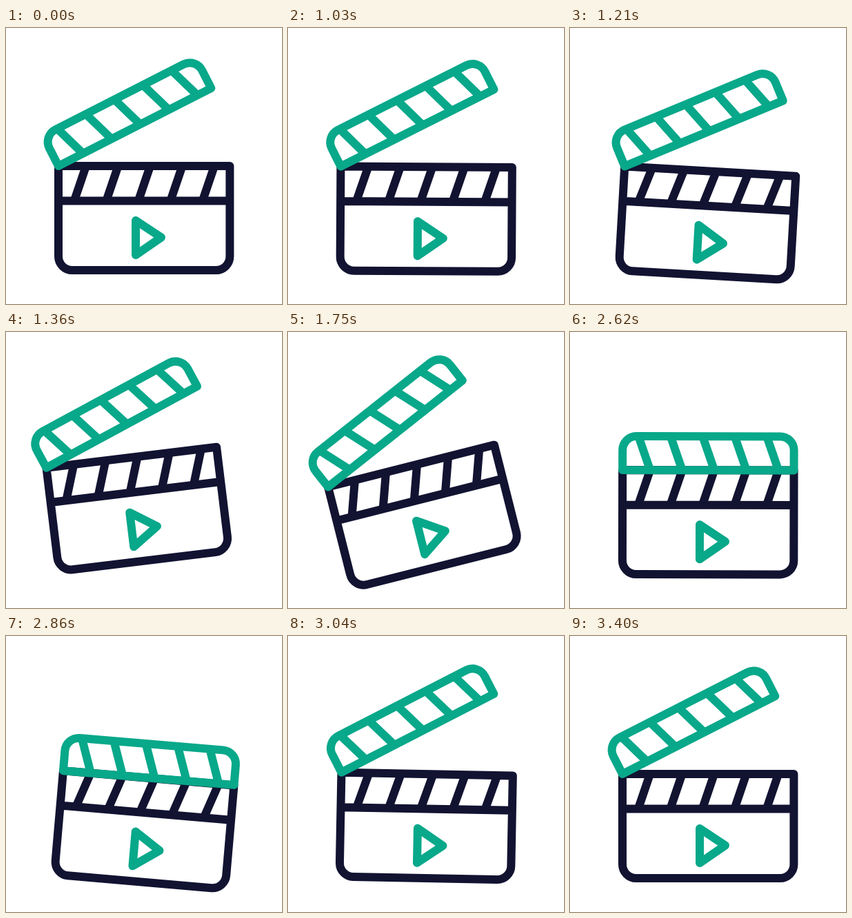
An HTML page that plays this animation: 400 by 400 pixels, repeating every 3430 ms.

```html
<!DOCTYPE html>
<html lang="en">
<head>
<meta charset="utf-8">
<title>Clapperboard</title>
<style>
  html, body { margin: 0; width: 100%; height: 100%; overflow: hidden; background: #fff; }
  svg { display: block; width: 100vw; height: 100vh; }
  path { fill: none; stroke-width: 12; stroke-linejoin: round; }
  .dark { stroke: #121331; }
  .green { stroke: #08a88a; }
</style>
</head>
<body>
<svg viewBox="0 0 400 400">
  <g id="board">
    <path id="bodyBars" class="dark"/>
    <path class="dark" d="M76 250.5H324.4M76 200H324.4V331A20 20 0 0 1 304.4 351H96A20 20 0 0 1 76 331Z"/>
    <path class="green" d="M188 279V329L225 303.5Z"/>
    <g id="arm">
      <path id="armBars" class="green"/>
      <path class="green" d="M76 200V171A20 20 0 0 1 96 151H304.4A20 20 0 0 1 324.4 171V200Z"/>
    </g>
  </g>
</svg>
<script>
const LOOP = 3430, STEP = 30, START = 1000;
const get = id => document.getElementById(id);
const board = get('board'), arm = get('arm');

// Five slanted bars, from height y0 to y1
function bars(id, x0, y0, x1, y1) {
  let d = '';
  for (let dx = 0; dx < 5 * 46.5; dx += 46.5) d += `M${x0 + dx} ${y0}L${x1 + dx} ${y1}`;
  get(id).setAttribute('d', d);
}
bars('bodyBars', 116, 200, 99, 250);
bars('armBars', 99, 151, 116, 200);

function draw(time) {
  const raw = time % LOOP;
  const t = START + Math.floor((raw - START) / STEP) * STEP;

  // Smooth rise from 0 to 1 between two times
  const ease = (from, to) => {
    const p = Math.min(1, Math.max(0, (t - from) / (to - from)));
    return p * p * (3 - 2 * p);
  };
  // Rise to 1 at the peak, then back to 0
  const bump = (from, peak, to) => ease(from, peak) - ease(peak, to);

  // Dip, swing up and back, land; later a small dip as the arm reopens
  const x = -11 * (ease(1150, 1430) - ease(1480, 1900));
  const y = 12 * ease(1000, 1150) - 34 * ease(1150, 1410) + 22 * ease(1480, 1940)
    + 9 * bump(2605, 2750, 3010);
  const tilt = 4 * ease(1000, 1170) - 19 * ease(1170, 1515) + 15 * ease(1700, 2050)
    + 5.5 * bump(2605, 2790, 3140);

  // Lag, swing wide, clap shut, rebound; later reopen past the rest angle
  const open = 27 - 5.6 * ease(1150, 1350) + 12.8 * ease(1350, 1600) - 34.2 * ease(1600, 2020)
    + 1.8 * bump(2020, 2170, 2320)
    + 35.9 * ease(2850, 3120) - 8.9 * ease(3120, 3400);

  board.setAttribute('transform', `translate(${x} ${y}) rotate(${tilt} 200 275.5)`);
  arm.setAttribute('transform', `rotate(${-open} 76 200)`);
}

const begin = performance.now();
function tick() {
  draw(performance.now() - begin);
  requestAnimationFrame(tick);
}
tick();
</script>
</body>
</html>
```
